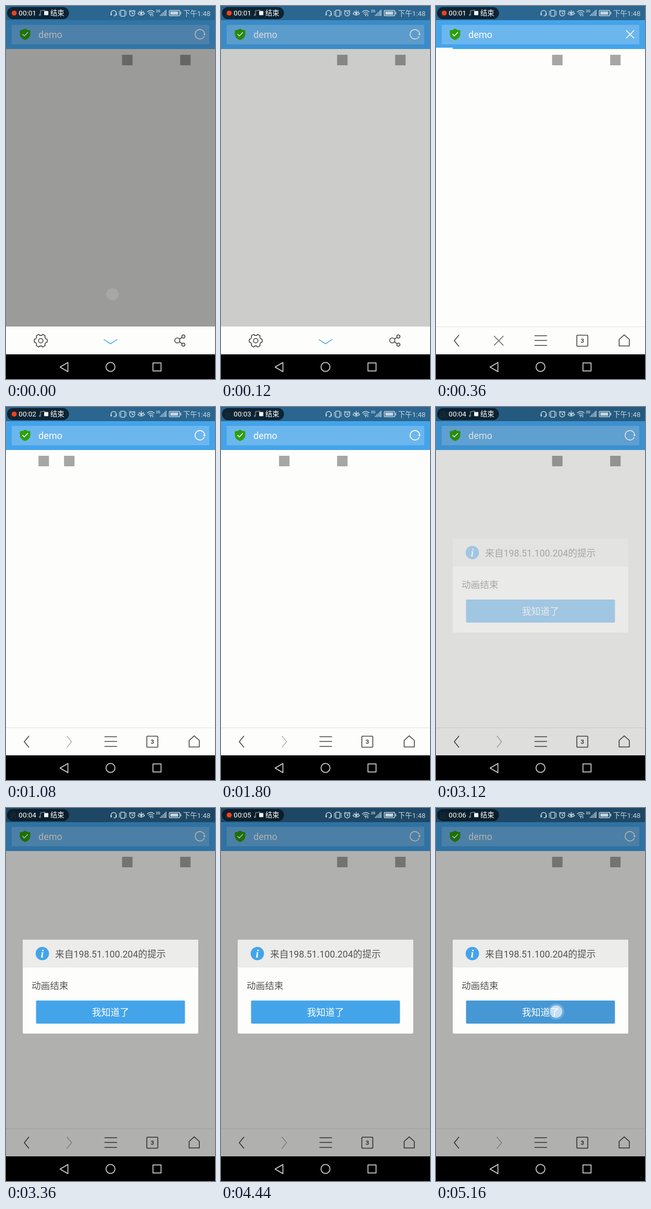
Write an HTML page that moves like this. It is 400 px wide and 711 px high and loops after 5280 ms.

```html
<!DOCTYPE html>
<html lang="zh">
<head>
<meta charset="utf-8">
<title>demo</title>
<style>
  html, body { margin: 0; width: 100%; height: 100%; overflow: hidden; background: #000; }
  svg { display: block; width: 100%; height: 100%; }
  text { font-family: Roboto, "Noto Sans CJK SC", "Noto Sans CJK", sans-serif; }
  .line { fill: none; stroke: #444; stroke-width: 1.6; }
  .white { fill: none; stroke: #fff; stroke-width: 1.7; }
  .nav { fill: none; stroke: #d2d2d2; stroke-width: 1.7; stroke-linejoin: round; }
  .status { fill: none; stroke: #c6d5df; stroke-width: 1.4; }
  .solid { fill: #c6d5df; stroke: none; }
</style>
</head>
<body>
<svg viewBox="0 0 400 711" xmlns="http://www.w3.org/2000/svg">
  <rect width="400" height="711" fill="#fdfdfb"/>

  <g fill="#a6a6a4">
    <rect id="boxA" y="93" width="20" height="20"/>
    <rect id="boxB" y="93" width="20" height="20"/>
  </g>

  <rect width="400" height="27" fill="#2a6690"/>
  <g id="header">
    <rect y="27" width="400" height="55" fill="#44a4ea"/>
    <rect x="11" y="36" width="378" height="37" rx="1" fill="#6cb6ee"/>
    <path d="M36.5 43 Q41 46.300 46.500 46.300 V54 Q46 61.500 36.500 65 Q27 61.500 26.500 54 V46.300 Q32 46.300 36.500 43Z" fill="#2ca00a"/>
    <path d="M31.500 53.500 L35 57 L42 50" class="white" stroke-width="2.400"/>
    <text x="62" y="61" font-size="18" fill="#fff">demo</text>
    <g id="reload" class="white">
      <path d="M379.300 57.500 A9 9 0 1 1 380 53"/>
      <path d="M377.300 53 H382.300 L379.900 56.300Z" fill="#fff" stroke="none"/>
    </g>
    <path id="cancel" class="white" d="M364 46.500 L379 61.500 M379 46.500 L364 61.500"/>
    <rect id="progress" y="79.500" height="2.500" fill="#fff"/>
  </g>

  <g id="toolbar">
    <path d="M0 611.500 H400" stroke="#e3e3e1"/>
    <path class="line" d="M44 627 L35 638 L44 649"/>
    <path id="forward" class="line" style="stroke:#b4b4b2" d="M116.500 627 L125.500 638 L116.500 649"/>
    <path id="stop" class="line" style="stroke:#666" d="M111 629 L129 647 M129 629 L111 647"/>
    <path class="line" d="M188.500 628.500 H212.500 M188.500 637.500 H212.500 M188.500 647 H212.500"/>
    <rect class="line" x="269.500" y="627.500" width="21" height="21" rx="1"/>
    <text x="280" y="642" font-size="11.500" font-weight="700" fill="#444" text-anchor="middle">3</text>
    <path class="line" stroke-linejoin="round" d="M350.500 635.500 L360.200 626.800 L370 635.500 V648 H350.500Z"/>
  </g>

  <rect id="headerShade" y="27" width="400" height="55"/>
  <rect id="pageShade" y="82" width="400" height="529"/>

  <g id="menu">
    <rect y="611" width="400" height="53" fill="#fdfdfc"/>
    <path id="gear" class="line" stroke-linejoin="round"/>
    <circle class="line" cx="66.500" cy="638" r="4.300"/>
    <path d="M187 635.500 L200 643.800 L213 635.500" fill="none" stroke="#3e9bdd" stroke-width="1.400"/>
    <g class="line">
      <circle cx="327.800" cy="637.500" r="4.800"/>
      <circle cx="339.500" cy="630" r="3"/>
      <circle cx="339.500" cy="645.500" r="3"/>
      <path d="M331.900 635 L337 631.700 M331.900 640 L337 643.800"/>
    </g>
  </g>

  <rect id="shade" width="400" height="664"/>

  <rect y="664" width="400" height="47" fill="#000"/>
  <g class="nav">
    <path d="M118.500 679.500 V697 L103.500 688.200Z"/>
    <circle cx="200" cy="688" r="8.600"/>
    <rect x="281.300" y="680.300" width="15.400" height="15.400"/>
  </g>

  <g class="status">
    <path d="M201 16 V13.500 A5 5 0 0 1 211 13.500 V16 M210 18.500 H206"/>
    <path d="M201.300 13.500 V18 M210.700 13.500 V18" stroke-width="2.400"/>
    <rect x="219.500" y="8" width="8" height="11.500" rx="1"/>
    <path d="M217 9.500 V18 M230 9.500 V18" stroke-dasharray="2.500 .6"/>
    <circle cx="241.500" cy="14" r="5"/>
    <path d="M241.500 11 V14.500 H244 M235.500 10.500 L238.500 7.800 M247.500 10.500 L244.500 7.800"/>
    <path d="M252.500 14.500 Q258.800 8 265.300 14.500 Q258.800 20.500 252.500 14.500Z M254 10 L255.300 11.300 M258.900 7.500 V10 M263.800 10 L262.500 11.300"/>
    <circle class="solid" cx="258.900" cy="14.300" r="2.200"/>
    <path d="M270 11.500 Q277 5.500 284 11.500 M272.300 14 Q277 10.200 281.700 14 M274.500 16.500 Q277 14.500 279.500 16.500"/>
    <path d="M277 17 V19.500 M281 15.500 V19.500"/>
    <path d="M295.500 16.500 V19 M298.300 14 V19 M301 11.500 V19 M303.800 9 V19 M306.300 7 V19"/>
    <rect x="312.500" y="8.500" width="20" height="10" rx="1"/>
    <rect class="solid" x="314.500" y="10.500" width="15" height="6"/>
    <path d="M334.500 11 V16" stroke-width="1.600"/>
    <text class="solid" x="287" y="12" font-size="6.500" font-weight="700">2G</text>
    <text class="solid" x="339" y="18.500" font-size="13.400">下午1:48</text>
  </g>

  <text x="7" y="18.500" font-size="13" fill="#8fa9bb">远禾通信</text>
  <rect x="2" y="2" width="118.500" height="23" rx="11.500" fill="#06131d" fill-opacity=".8"/>
  <g fill="none" stroke="#7c8c96" stroke-width="1.300">
    <path d="M66 17 V9 L74 7.800 V15"/>
    <circle cx="64.800" cy="17" r="1.300"/>
  </g>
  <circle id="rec" cx="15.700" cy="13.500" r="4.800" fill="#f5401e"/>
  <text id="clock" x="24.300" y="18.300" font-size="13.500" fill="#fff"></text>
  <rect x="73" y="9.500" width="8" height="8" rx="1" fill="#f4f4f4"/>
  <text x="85" y="18.300" font-size="13.200" fill="#fff">结束</text>

  <g id="dialog">
    <rect x="32" y="251" width="336" height="179" rx="2" fill="#fdfdfb"/>
    <path d="M32 303 V253 Q32 251 34 251 H366 Q368 251 368 253 V303Z" fill="#ececea"/>
    <path d="M32 303 H368" stroke="#e0e0de"/>
    <circle cx="69.500" cy="277.500" r="12.800" fill="#44a4ea"/>
    <text x="69.300" y="284.500" text-anchor="middle" fill="#fff" font-size="21" style="font-family:'Liberation Serif',serif;font-style:italic;font-weight:700">i</text>
    <text x="94" y="284.500" font-size="17.700" fill="#555">来自198.51.100.204的提示</text>
    <text x="49" y="344.700" font-size="17.600" fill="#555">动画结束</text>
    <rect id="button" x="57.500" y="367" width="285" height="44" rx="2"/>
    <text x="200" y="396" font-size="17.800" fill="#fff" text-anchor="middle">我知道了</text>
  </g>

  <g id="touch" fill="#fff">
    <circle id="halo" r="15.500" fill-opacity=".2"/>
    <circle r="11.800" fill-opacity=".62"/>
  </g>
</svg>
<script>
const LOOP = 5280, STEP = 120;
const el = {};
document.querySelectorAll('[id]').forEach(node => el[node.id] = node);

const set = (node, name, value) => node.setAttribute(name, value);
const show = (node, on) => node.style.display = on ? '' : 'none';
const within = (t, from, to) => t >= from && t < to;

// Linear value from [time, value] steps
function track(t, steps) {
  if (t <= steps[0][0]) return steps[0][1];
  for (let i = 1; i < steps.length; i++) {
    const [t0, v0] = steps[i - 1], [t1, v1] = steps[i];
    if (t < t1) return v0 + (v1 - v0) * (t - t0) / (t1 - t0);
  }
  return steps[steps.length - 1][1];
}

function gearPath(cx, cy, teeth) {
  const points = [];
  for (let i = 0; i < teeth; i++) {
    for (const [turn, r] of [[-.32, 10.3], [-.2, 12.7], [.2, 12.7], [.32, 10.3]]) {
      const a = (i + turn) * 2 * Math.PI / teeth;
      points.push((cx + r * Math.cos(a)).toFixed(1) + ' ' + (cy + r * Math.sin(a)).toFixed(1));
    }
  }
  return 'M' + points.join('L') + 'Z';
}

const TICKS = [720, 1720, 2720, 3720, 4680];
const REC_OFF = [[1320, 2040], [2880, 4080], [4680, LOOP]];
const RELOADED = 600;

function draw(t) {
  // Menu closes
  const cover = track(t, [[0, 1], [240, 0]]);
  set(el.pageShade, 'opacity', .39 * cover);
  set(el.headerShade, 'opacity', .29 * cover);
  set(el.menu, 'opacity', track(t, [[0, 1], [120, 1], [240, 0]]));

  // Page reloads
  const loading = within(t, 240, 900);
  show(el.cancel, loading);
  show(el.stop, loading);
  show(el.reload, !loading);
  show(el.forward, !loading);
  show(el.progress, loading);
  set(el.progress, 'width', track(t, [[240, 0], [360, 32], [600, 140], [840, 389]]));

  // Squares run one after the other
  const fresh = t >= RELOADED;
  set(el.boxA, 'x', fresh ? track(t, [[800, 0], [1800, 222.2]]) : 222.2);
  set(el.boxB, 'x', fresh ? track(t, [[1840, 111.1], [2840, 333.3]]) : 333.3);

  // Alert
  const alert = track(t, [[3000, 0], [3300, 1]]);
  set(el.shade, 'opacity', .305 * alert);
  set(el.dialog, 'opacity', alert);
  set(el.button, 'fill', t >= 5020 ? '#4698d4' : '#44a4ea');

  // Finger
  const tap = t >= 4920;
  set(el.touch, 'transform', tap ? 'translate(230 388)' : 'translate(203.7 549.5)');
  set(el.touch, 'opacity', tap ? track(t, [[4920, .6], [5040, 1]]) : track(t, [[0, .2], [120, 0]]));
  show(el.halo, tap);

  // Recorder
  el.clock.textContent = '00:0' + (1 + TICKS.filter(tick => t >= tick).length);
  show(el.rec, !REC_OFF.some(([from, to]) => within(t, from, to)));
}

set(el.gear, 'd', gearPath(66.5, 638, 6));
const start = performance.now();
function loop() {
  const t = (performance.now() - start) % LOOP;
  draw(Math.floor(t / STEP) * STEP);
  requestAnimationFrame(loop);
}
loop();
</script>
</body>
</html>
```
